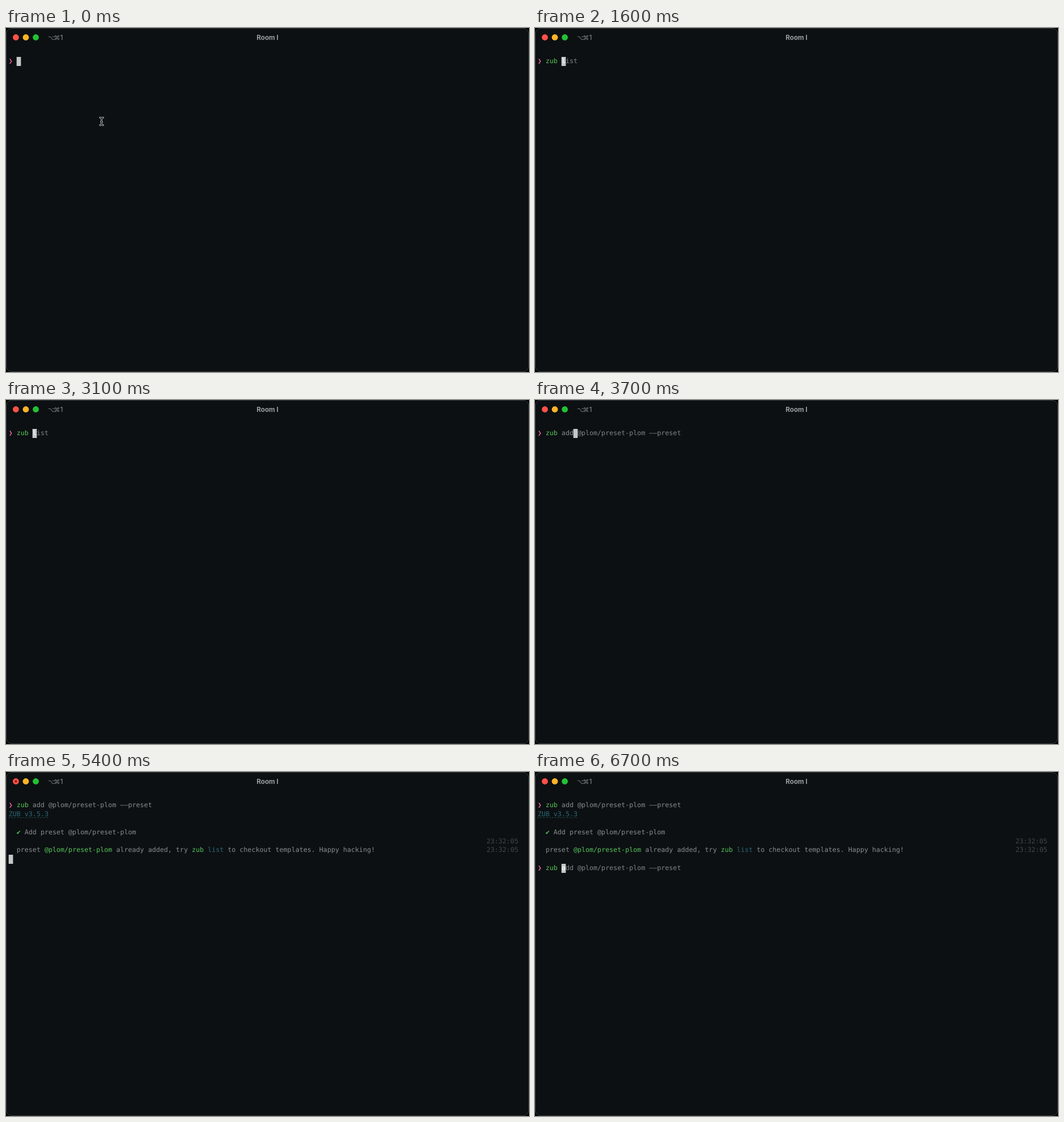
Animation of 923 by 607 pixels, one loop 8 s. Source, as an HTML page:

```html
<!DOCTYPE html>
<html lang="en">
<head>
<meta charset="utf-8">
<title>Terminal</title>
<style>
  html, body { margin: 0; width: 100%; height: 100%; overflow: hidden; background: #000; }
  #window {
    position: absolute; inset: 0; box-sizing: border-box; overflow: hidden;
    background: #0c1012; border: 1px solid #393c3d; border-radius: 10px;
  }
  #chrome { position: absolute; left: 0; top: 0; }
  #screen {
    position: absolute; left: 4.7px; top: 51.2px; white-space: pre; color: #898c8e;
    font: 11.68px/15.85px "DejaVu Sans Mono", monospace;
    font-variant-ligatures: none; text-rendering: geometricPrecision;
  }
  .row { height: 15.85px; }
  .cell { display: inline-block; width: 7.03px; height: 15.85px; vertical-align: top; }
  .cursor { background: #c5c8c9; color: #fff; box-shadow: -.3px 0 #c5c8c9, .4px 0 #c5c8c9; }
  .prompt { color: #f0649c; font-weight: 700; }
  .green { color: #57c45c; }
  .teal { color: #2b6878; }
  .banner { color: #2b6878; text-decoration: underline dashed 1px #1e4650; text-underline-offset: 2px; }
  .ghost { color: #818486; }
  .time { color: #434748; }
</style>
</head>
<body>
<div id="window"></div>
<svg id="chrome" width="923" height="607">
  <circle cx="17.4" cy="16.5" r="5.4" fill="#fe5149"/>
  <circle id="busy" cx="17.4" cy="16.5" r="1.9" fill="#86150f"/>
  <circle cx="35" cy="16.5" r="5.4" fill="#fdb326"/>
  <circle cx="52.6" cy="16.5" r="5.4" fill="#22c136"/>
  <g fill="#7b7e80" font-family="'DejaVu Sans', sans-serif" font-size="11">
    <text x="74" y="20.5">⌥</text>
    <text x="84.5" y="20.5">⌘</text>
    <text x="95.5" y="20.8" font-family="Inter, sans-serif" font-size="12" font-weight="500">1</text>
  </g>
  <text x="461.5" y="20.8" fill="#9a9d9e" text-anchor="middle" font-family="Inter, sans-serif" font-size="11.7" font-weight="700">Room I</text>
  <defs>
    <path id="beam" fill="none" stroke-linecap="round" d="M165.8 158.2Q168.7 158.2 168.7 161V168.5Q168.7 171.3 165.8 171.3M171.6 158.2Q168.7 158.2 168.7 161M168.7 168.5Q168.7 171.3 171.6 171.3M167.6 165.5H169.8"/>
  </defs>
  <g id="pointer">
    <use href="#beam" stroke="#dfe1e1" stroke-width="2.7"/>
    <use href="#beam" stroke="#0b0d0e" stroke-width="1.2"/>
  </g>
</svg>
<div id="screen"></div>
<script>
const LOOP = 8000;
const PRESET = '@plom/preset-plom';
const LIST = 'zub list';
const ADD = `zub add ${PRESET} ––preset`; // en dashes join like a coding ligature
const CLOCK = '23:32:05';
const CLOCK_COLUMN = 120;

// When each command line takes on a new content.
const FIRST_INPUT = [
  [0, ''], [900, 'z'], [1100, 'zu'], [1300, 'zub'], [1500, 'zub '],
  [3200, 'zub a'], [3400, 'zub ad'], [3500, 'zub add'], [3800, ADD]
];
const SECOND_INPUT = [[0, ''], [6100, 'z'], [6200, 'zu'], [6400, 'zub'], [6500, 'zub ']];
const ENTER = 4300, BANNER = 4400, READY = 4500, ADDED = 5200, MESSAGE = 5300, RETURN = 5700;

const byId = id => document.getElementById(id);
const span = (style, text) => `<span class="${style}">${text}</span>`;
const cell = (style, text) => span('cell ' + style, text);
const cursor = (char = ' ') => cell('cursor', char);
const valueAt = (steps, t) => steps.filter(([start]) => start <= t).pop()[1];

function commandLine(typed, history, active = true) {
  const name = typed.slice(0, 3), rest = typed.slice(3);
  let line = cell('prompt', '❯') + ' ' + span('green', name) + rest;
  if (active) {
    const match = typed && history.find(entry => entry.startsWith(typed)) || '';
    const ghost = match.slice(typed.length);
    line += cursor(ghost[0]) + span('ghost', ghost.slice(1));
  }
  return line;
}

function rowsAt(t) {
  if (t < ENTER) return [commandLine(valueAt(FIRST_INPUT, t), [LIST, ADD])];

  const rows = [commandLine(ADD, [], false)];
  if (t >= BANNER) rows.push(span('banner', 'ZUB v3.5.3'));
  if (t >= READY) rows.push('');
  if (t >= ADDED) rows.push(
    `  ${cell('green', '✔')} Add preset ${PRESET}`,
    ' '.repeat(CLOCK_COLUMN) + span('time', CLOCK)
  );
  if (t >= MESSAGE) {
    const before = '  preset ', middle = ' already added, try ';
    const after = ' to checkout templates. Happy hacking!';
    const length = (before + PRESET + middle + LIST + after).length;
    rows.push(before + span('green', PRESET) + middle + span('green', 'zub') + ' ' +
      span('teal', 'list') + after + ' '.repeat(CLOCK_COLUMN - length) + span('time', CLOCK));
  }
  if (t >= RETURN) rows.push('', commandLine(valueAt(SECOND_INPUT, t), [ADD]));
  else rows.push(cursor());
  return rows;
}

let shown = '';
function draw(now) {
  const t = now % LOOP;
  const html = rowsAt(t).map(row => `<div class="row">${row}</div>`).join('');
  if (html !== shown) byId('screen').innerHTML = shown = html;
  byId('pointer').style.display = t < 900 ? '' : 'none';
  byId('busy').style.display = t >= 4700 && t < 6200 ? '' : 'none';
  requestAnimationFrame(draw);
}
draw(performance.now());
</script>
</body>
</html>
```
